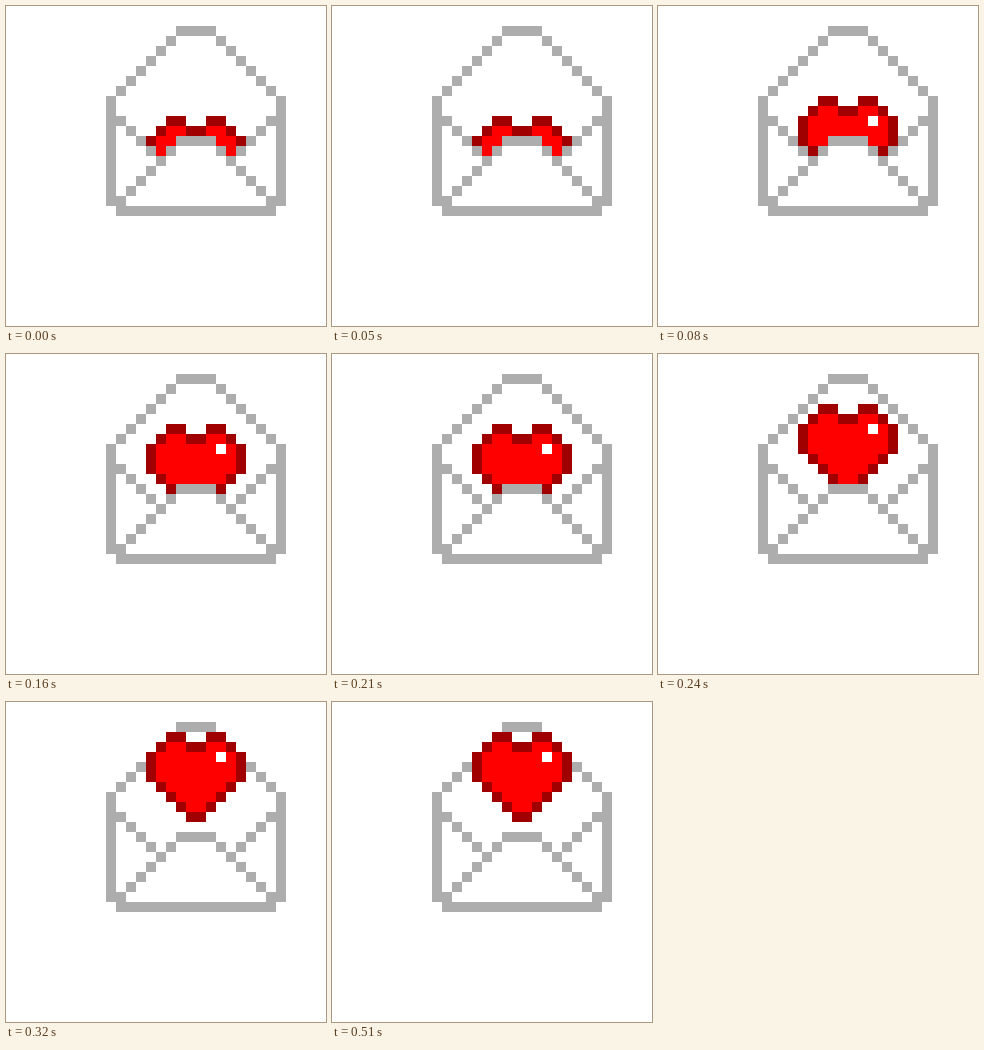
Recreate the animation shown at these times as an HTML page with a canvas. Size 320 by 320 pixels, loop 0.64 s.

```html
<!DOCTYPE html>
<html>
<head>
<meta charset="utf-8">
<title>Heart in an envelope</title>
<style>
  html, body { margin: 0; overflow: hidden; background: #fff; }
  canvas { display: block; }
</style>
</head>
<body>
<canvas id="stage" width="320" height="320"></canvas>
<script>
const ctx = document.getElementById('stage').getContext('2d');
const CELL = 10, STEP = 80, LOOP = 640, REST = 4;
const GREY = '#adadad';
const COLORS = { d: '#a00000', r: '#ff0000', w: '#ffffff' };

// d: outline, r: fill, w: highlight
const HEART = [
  '  dd  dd  ',
  ' drrddrrd ',
  'drrrrrrwrd',
  'drrrrrrrrd',
  'drrrrrrrrd',
  ' drrrrrrd ',
  '  drrrrd  ',
  '   drrd   ',
  '    dd    '
];

function block(col, row, color, w = 1, h = 1) {
  ctx.fillStyle = color;
  ctx.fillRect(col * CELL, row * CELL, w * CELL, h * CELL);
}

// Mirrored diagonal of grey cells
function diagonal(col, row, count, dy) {
  for (let i = 0; i < count; i++) {
    block(col + i, row + i * dy, GREY);
    block(37 - col - i, row + i * dy, GREY);
  }
}

function drawBack() {
  block(17, 2, GREY, 4);
  diagonal(11, 8, 6, -1);
}

function drawFront() {
  block(10, 9, GREY, 1, 11);
  block(27, 9, GREY, 1, 11);
  block(11, 20, GREY, 16);
  diagonal(11, 11, 5, 1);
  diagonal(11, 19, 6, -1);
  block(17, 13, GREY, 4);
}

// The pocket hides everything below its V-shaped edge
function drawHeart(top) {
  HEART.forEach((line, y) => [...line].forEach((key, x) => {
    const col = 14 + x, row = top + y;
    const visible = row < 14 || (row === 14 && Math.abs(col - 18.5) > 2);
    if (key === ' ' || !visible) return;
    block(col, row, COLORS[key === 'w' && row > 12 ? 'r' : key]);
  }));
}

function draw() {
  const step = Math.min(REST, Math.floor(performance.now() % LOOP / STEP));
  block(0, 0, '#fff', 32, 32);
  drawBack();
  drawHeart(11 - 2 * step);
  drawFront();
  requestAnimationFrame(draw);
}
draw();
</script>
</body>
</html>
```
